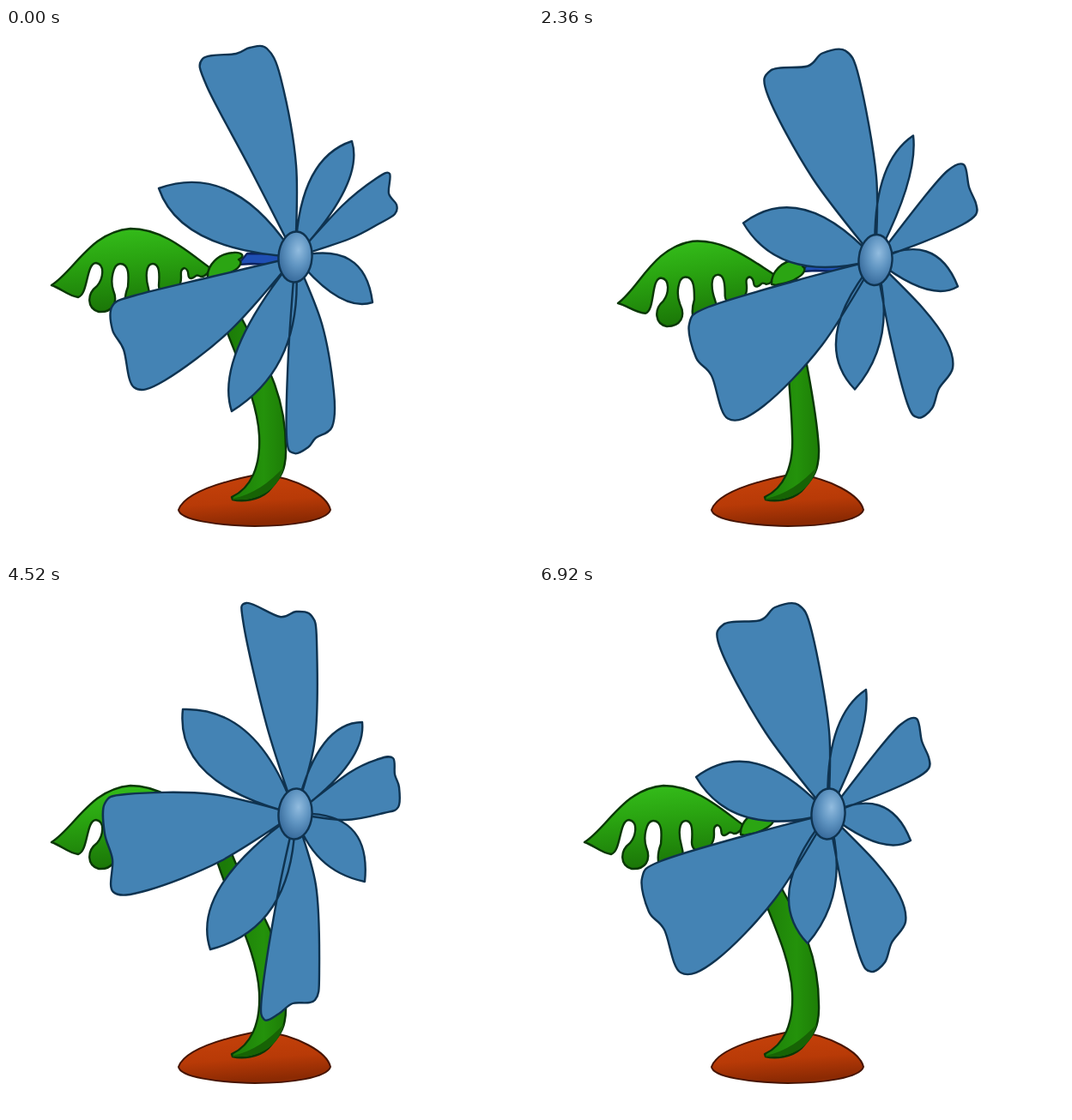
These frames come from a looping animation (614 by 617 pixels, 7000 ms). An HTML page:

```html
<!DOCTYPE html>
<html>
<head>
<meta charset="utf-8">
<style>
html, body { margin: 0; width: 100%; height: 100%; overflow: hidden; background: #fff; }
svg { display: block; }
</style>
</head>
<body>
<svg width="614" height="617" viewBox="0 0 614 617" stroke-width="2.4" stroke-linejoin="round">
  <defs>
    <linearGradient id="leafFill" x1="0" y1="0" x2="0.15" y2="1">
      <stop offset="0" stop-color="#36c01c"/><stop offset=".4" stop-color="#2aa511"/><stop offset="1" stop-color="#1a7407"/>
    </linearGradient>
    <linearGradient id="stemFill" gradientUnits="userSpaceOnUse" x1="255" y1="0" x2="330" y2="0">
      <stop offset="0" stop-color="#1b7a08"/><stop offset=".6" stop-color="#24920b"/><stop offset="1" stop-color="#1c7a06"/>
    </linearGradient>
    <linearGradient id="dirtFill" x1="0" y1="0" x2="0.2" y2="1">
      <stop offset="0" stop-color="#c8430b"/><stop offset=".6" stop-color="#b83a07"/><stop offset="1" stop-color="#8c2a03"/>
    </linearGradient>
    <radialGradient id="hubFill" cx=".58" cy=".36" r=".65">
      <stop offset="0" stop-color="#92bcdf"/><stop offset=".5" stop-color="#5f94c1"/><stop offset="1" stop-color="#36699a"/>
    </radialGradient>
  </defs>
  <path fill="url(#dirtFill)" stroke="#461402" stroke-width="2" d="M201 562C207 545 240 531 297 520C340 525 374 545 378 562C374 575 330 581 290 581C245 580 203 574 201 562Z"/>
  <g stroke="#0a3806">
    <path id="stem" fill="url(#stemFill)"/>
    <path fill="#176305" stroke="none" d="M264 549C288 544 306 531 324 512C318 535 300 552 264 550Z"/>
    <path id="leaf" fill="url(#leafFill)" d="M238 280C214 263 184 234 145 234C98 238 80 283 53 300C63 303 73 313 84 314C96 311 93 274 105 274C116 276 113 293 106 301C94 310 94 327 108 331C124 332 131 321 125 306C121 294 125 275 133 275C144 275 143 290 142 302C136 318 138 336 152 336C168 335 170 318 166 304C162 290 163 275 171 275C179 275 179 287 178 300C178 315 198 315 202 300C207 292 200 282 208 280C216 283 209 292 216 292C222 291 220 286 227 290C233 290 236 285 238 280Z"/>
    <g id="neck">
      <path fill="#1f4fb4" stroke="#0c2360" d="M270 276L281 263L338 264L310 276L286 275Z"/>
      <path fill="#2ba513" d="M235 291C234 277 247 263 265 262C274 261 280 266 271 270C276 273 273 279 264 284C256 290 246 290 240 292Z"/>
    </g>
  </g>
  <g id="head" stroke="#0f3350">
    <path id="petals" fill="#4483b4"/>
    <ellipse rx="19.5" ry="29.5" transform="rotate(4)" fill="url(#hubFill)"/>
  </g>
</svg>
<script>
const HUB = [337, 267], LAPS = 7000;
const $ = id => document.getElementById(id);

// Blades top, right, bottom, left, then petals left, top, right, bottom.
const poses = [
  ['264 172 212 76 215 46 258 41 275 26 302 23 318 55 338 170',
   '392 196 421 163 440 156 446 182 454 201 454 214 438 226 398 244',
   '392 323 420 362 427 393 411 417 403 440 387 451 374 434 354 356',
   '275 366 207 437 165 452 146 402 128 381 120 342 142 322 245 291',
   '243 271 183 224 256 209', '345 175 381 122 373 183',
   '396 257 433 298 393 300', '345 350 313 418 292 352'],
  ['285 165 234 68 229 36 268 30 284 23 304 24 320 58 338 160',
   '392 207 432 175 447 170 446 193 455 206 453 217 435 228 400 246',
   '368 345 382 425 380 465 361 478 352 489 336 496 327 478 329 380',
   '262 352 185 411 149 419 137 375 124 352 124 324 150 312 240 290',
   '230 243 178 187 262 191', '355 176 403 132 394 190',
   '400 270 427 320 386 313', '325 375 263 447 271 371'],
  ['304 165 277 47 280 21 319 37 338 31 356 36 362 65 360 180',
   '400 219 434 203 451 202 453 221 458 236 457 259 440 266 395 274',
   '361 350 365 450 360 484 334 488 318 500 301 507 298 480 315 370',
   '250 322 165 356 125 358 124 320 115 290 115 255 140 244 240 244',
   '234 219 206 145 283 174', '369 187 415 160 398 210',
   '402 284 418 346 367 320', '312 373 238 425 251 350']
].map(pose => pose.map(toPoints));

function toPoints(text) {
  const v = text.split(' ').map(Number), out = [];
  for (let i = 0; i < v.length; i += 2) out.push([v[i] - HUB[0], v[i + 1] - HUB[1]]);
  return out;
}

// Midway turn about the hub between two points, clockwise.
function turn([ax, ay], [bx, by]) {
  const a = Math.atan2(ay, ax);
  let d = Math.atan2(by, bx) - a;
  if (d < 0) d += 2 * Math.PI;
  const r = (Math.hypot(ax, ay) + Math.hypot(bx, by)) / 2;
  return [r * Math.cos(a + d / 2), r * Math.sin(a + d / 2)];
}
poses.push(poses[2].map((shape, i) => {
  const next = poses[0][i < 4 ? (i + 1) % 4 : 4 + (i - 3) % 4];
  return shape.map((pt, k) => turn(pt, next[k]));
}));

// Smooth curve through the points, starting and ending at the hub.
function blade(pts) {
  const all = [[0, 0], ...pts, [0, 0]], last = all.length - 1;
  let d = 'M0 0';
  for (let i = 0; i < last; i++) {
    const a = all[Math.max(i - 1, 0)], b = all[i], c = all[i + 1], e = all[Math.min(i + 2, last)];
    const c1 = b.map((v, k) => v + (c[k] - a[k]) / 6);
    const c2 = c.map((v, k) => v - (e[k] - b[k]) / 6);
    d += `C${c1} ${c2} ${c}`;
  }
  return d + 'Z';
}

function petal([m1, tip, m2]) {
  const ctrl = m => m.map((v, k) => 2 * v - tip[k] / 2);
  return `M0 0Q${ctrl(m1)} ${tip}Q${ctrl(m2)} 0 0Z`;
}

const petalPaths = poses.map(pose =>
  pose.slice(4).map(petal).join('') + pose.slice(0, 4).map(blade).join(''));

function stemPath(p) {
  const at = (a, b) => a + (b - a) * p;
  return `M263 547C285 537 297 512 295 475` +
    `C${at(292, 294)} ${at(420, 430)} ${at(255, 288)} ${at(365, 380)} ${at(236, 282)} ${at(288, 295)}` +
    `L${at(256, 300)} ${at(285, 290)}` +
    `C${at(264, 300)} ${at(350, 360)} ${at(326, 322)} ${at(390, 420)} 326 490` +
    `C327 518 318 526 306 540C294 551 275 553 264 550Z`;
}

function draw(now) {
  const t = now % LAPS;
  const n = t < 40 ? 0 : Math.floor((t - 40) / 80) + 1;
  // Lean right over ten steps, hold, lean back.
  const p = n < 10 ? n / 10 : n < 46 ? 1 : Math.max(0, (56 - n) / 10);
  const spin = n >= 10 && n < 56 ? n + 2 : n + 1;
  $('stem').setAttribute('d', stemPath(p));
  $('leaf').setAttribute('transform', `translate(${39 * p} ${21 * p}) rotate(${-4 * p} 53 300)`);
  $('neck').setAttribute('transform', `translate(${36 * p} ${8 * p})`);
  $('head').setAttribute('transform', `translate(${HUB[0] + 55 * p} ${HUB[1] + 3.5 * p})`);
  $('petals').setAttribute('d', petalPaths[spin % 4]);
}

const start = performance.now();
function tick() {
  draw(performance.now() - start);
  requestAnimationFrame(tick);
}
tick();
</script>
</body>
</html>
```
